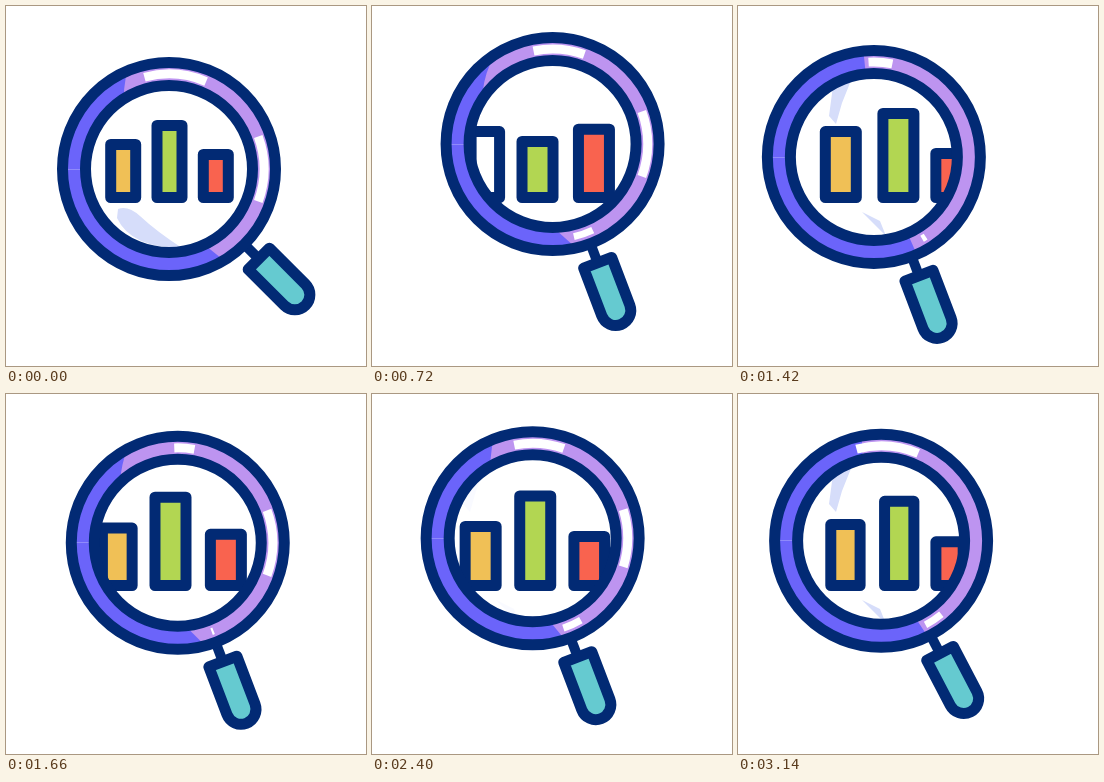
Write an HTML page with a canvas that moves like this. It is 360 by 360 pixels and loops after 3.16 s.

```html
<!DOCTYPE html>
<html lang="en">
<head>
<meta charset="utf-8">
<title>Magnified chart</title>
<style>
html, body { margin: 0; width: 100%; height: 100%; overflow: hidden; background: #fff; }
canvas { display: block; width: 360px; height: 360px; }
</style>
</head>
<body>
<canvas id="stage" width="360" height="360"></canvas>
<script>
const ctx = document.getElementById('stage').getContext('2d');
const LOOP = 3160, STEP = 20, START = 200, BEAT = 400, RAD = Math.PI / 180;
const NAVY = '#022a74', PURPLE = '#6b64fa', LILAC = '#bd94f0', PALE = '#d6ddfa';

// lens centre, distance from rest (0 to 1) and the tops of the three bars
const stop = (x, y, away, ...tops) => ({ x, y, away, tops });
const home = stop(163, 163, 0, 133, 114, 143);
const right = stop(193, 134.5, 1, 124, 130, 111);
const left = stop(135.5, 151, 1, 106, 130, 142);
const leftTall = { ...left, tops: [120, 102, 142] };
const rightLow = stop(186, 148, 1, 132, 96, 132);
const leftLow = stop(135.3, 140.5, 1, 122, 97, 142);

// one stop per beat; a repeated stop is a rest
const route = [home, right, left, leftTall, rightLow, rightLow, leftLow, leftLow, home];

const clamp = v => Math.max(0, Math.min(1, v));
const smooth = v => v * v * (3 - 2 * v);
const mix = (a, b, k) => a + (b - a) * k;

function poseAt(t) {
  const beat = Math.max(0, t - START) / BEAT, n = Math.floor(beat);
  const a = route[n], b = route[n + 1], k = smooth(beat - n);
  const x = mix(a.x, b.x, k);
  return {
    x, y: mix(a.y, b.y, k),
    away: mix(a.away, b.away, k),
    tops: a.tops.map((top, i) => mix(top, b.tops[i], k)),
    pan: (x - home.x) / 28,
    shine: Math.abs(Math.cos(Math.PI * t / LOOP)),
    tinted: t >= 1900 && t < 2110
  };
}

function circle(x, y, r) {
  ctx.beginPath();
  ctx.arc(x, y, r, 0, 2 * Math.PI);
}

function polygon(points, color, alpha = 1) {
  ctx.beginPath();
  points.forEach(([x, y]) => ctx.lineTo(x, y));
  ctx.closePath();
  ctx.globalAlpha = alpha;
  ctx.fillStyle = color;
  ctx.fill();
  ctx.globalAlpha = 1;
}

function outline() {
  ctx.strokeStyle = NAVY;
  ctx.lineWidth = 11;
  ctx.lineJoin = 'round';
  ctx.stroke();
}

function bar(x, w, top, color, striped) {
  const l = x - w / 2 + 5.5, r = l + w - 11, y = top + 5.5;
  const stripe = (y, h) => polygon([[l, y], [r, y - 18], [r, y - 18 + h], [l, y + h]], '#cbe483');
  ctx.fillStyle = color;
  ctx.fillRect(l, y, r - l, 191.5 - y);
  if (striped) {
    stripe(147, 9);
    stripe(164, 12);
  }
  ctx.beginPath();
  ctx.rect(l, y, r - l, 191.5 - y);
  outline();
}

// the glass widens the row and enlarges the bars on the lens side
function chart({ tops, away, pan, tinted }) {
  const fills = [pan > 0.6 ? '#fff' : '#f0c056', '#b2d652', tinted ? '#f4b5a5' : '#f9634f'];
  tops.forEach((top, i) => {
    const side = i - 1, lean = side * pan;
    const x = 163.5 + 3.2 * pan + side * (46.3 + away * (8 + 3.4 * lean));
    const w = 36 + away * (6 - 4 * clamp(-lean));
    bar(x, w, top, fills[i], tinted && side === 0);
  });
}

function reflections({ away, pan }) {
  ctx.globalAlpha = clamp(1 - 2 * away);
  ctx.fillStyle = PALE;
  ctx.beginPath();
  ctx.moveTo(112, 203);
  ctx.quadraticCurveTo(122, 199, 134, 210);
  ctx.quadraticCurveTo(150, 225, 176, 242);
  ctx.quadraticCurveTo(125, 242, 111, 212);
  ctx.fill();

  const alpha = clamp(-1.7 * pan);
  polygon([[95, 80], [114, 72], [104, 97], [98, 118], [91, 110]], PALE, alpha);
  polygon([[124, 206], [142, 215], [148, 230]], PALE, alpha);
}

function ring({ x, y, away, pan, shine }) {
  const band = (color, width = 14, mid = 0, half = 180) => {
    ctx.beginPath();
    ctx.arc(x, y, 95, (mid - half) * RAD, (mid + half) * RAD);
    ctx.strokeStyle = color;
    ctx.lineWidth = width;
    ctx.stroke();
  };
  const rim = deg => [x + 102 * Math.cos(deg * RAD), y + 102 * Math.sin(deg * RAD)];
  const low = 74 + 8 * pan - 14 * (1 - away);
  const [tx, ty] = rim(-115 - 20 * pan), [bx, by] = rim(low);

  band(PURPLE);
  ctx.save();
  ctx.beginPath();
  ctx.moveTo(tx, ty);
  ctx.quadraticCurveTo(x - 60 - 60 * pan, y, bx, by);
  ctx.lineTo(bx, y + 200);
  ctx.lineTo(x + 200, y + 200);
  ctx.lineTo(x + 200, y - 200);
  ctx.lineTo(tx, y - 200);
  ctx.clip();
  band(LILAC);
  ctx.restore();

  band('#fff', 9, -86, 5 + 14 * shine);
  band('#fff', 9, 0, 20 * clamp(1 + 1.5 * pan));
  band('#fff', 7, low - 8, 8 * away * shine);

  circle(x, y, 106.5);
  outline();
  circle(x, y, 83.5);
  outline();
}

function handle({ x, y, away, tinted }) {
  ctx.save();
  ctx.translate(x, y);
  ctx.rotate((45 + 24.2 * away) * RAD);
  ctx.fillStyle = NAVY;
  ctx.fillRect(108, -5, 18, 10);
  ctx.beginPath();
  ctx.moveTo(127, -15);
  ctx.arc(178, 0, 15, -Math.PI / 2, Math.PI / 2);
  ctx.lineTo(127, 15);
  ctx.closePath();
  ctx.fillStyle = tinted ? '#6c62d6' : '#65cad0';
  ctx.fill();
  outline();
  ctx.restore();
}

function draw(t) {
  const pose = poseAt(t);
  ctx.fillStyle = '#fff';
  ctx.fillRect(0, 0, 360, 360);
  handle(pose);

  ctx.save();
  circle(pose.x, pose.y, 84);
  ctx.clip();
  reflections(pose);
  chart(pose);
  ctx.restore();

  ring(pose);
}

function tick() {
  const t = performance.now() % LOOP;
  draw(Math.floor(t / STEP) * STEP);
  requestAnimationFrame(tick);
}
tick();
</script>
</body>
</html>
```
